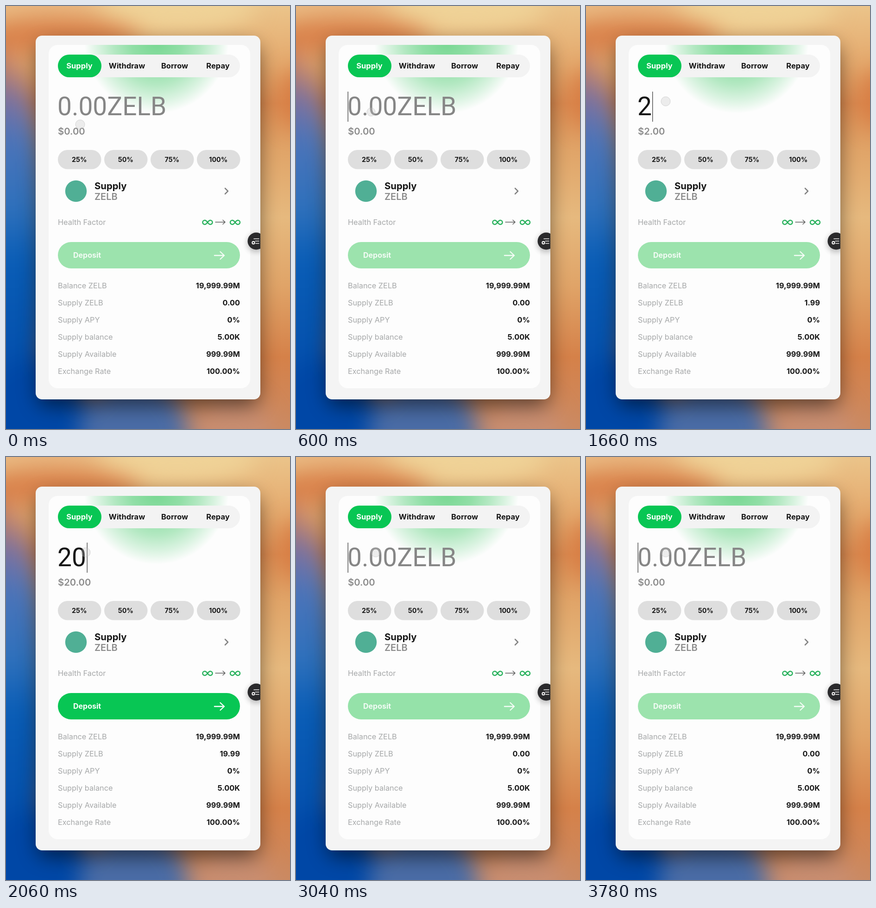
Write an HTML page that moves like this. It is 613x914 px and loops after 3.98 s.

```html
<!DOCTYPE html>
<html lang="en">
<head>
<meta charset="utf-8">
<title>Supply form</title>
<style>
html, body { margin: 0; width: 100%; height: 100%; overflow: hidden; background: #e2a468; }
svg { display: block; width: 613px; height: 914px; }
text { font-family: Inter, sans-serif; font-size: 16.3px; fill: #161616; }
.bold { font-weight: 700; }
.label { fill: #a6a8a9; }
.mid { text-anchor: middle; }
.end { text-anchor: end; }
.chip { font-size: 14.3px; font-weight: 700; }
.title { font-size: 20.3px; font-weight: 700; }
.sub { font-size: 20px; font-weight: 600; fill: #8b8b8b; }
.amount { font-family: Roboto, sans-serif; font-size: 55px; }
.line { fill: none; stroke-linecap: round; stroke-linejoin: round; }
</style>
</head>
<body>
<svg viewBox="0 0 613 914" xmlns="http://www.w3.org/2000/svg">
  <defs>
    <filter id="soft" x="-200" y="-200" width="1013" height="1314" filterUnits="userSpaceOnUse" color-interpolation-filters="sRGB">
      <feGaussianBlur stdDeviation="24"/>
    </filter>
    <filter id="shade" x="-40" y="-40" width="700" height="1010" filterUnits="userSpaceOnUse">
      <feGaussianBlur stdDeviation="22"/>
    </filter>
    <filter id="lift" x="480" y="450" width="120" height="130" filterUnits="userSpaceOnUse">
      <feGaussianBlur stdDeviation="6"/>
    </filter>
    <linearGradient id="left" x1="0" y1="0" x2="0" y2="914" gradientUnits="userSpaceOnUse">
      <stop offset=".07" stop-color="#dd8b57"/>
      <stop offset=".15" stop-color="#b9806f"/>
      <stop offset=".22" stop-color="#7c719f"/>
      <stop offset=".32" stop-color="#4b74b9"/>
      <stop offset=".48" stop-color="#2e70bb"/>
      <stop offset=".6" stop-color="#0a5db6"/>
      <stop offset="1" stop-color="#0047a6"/>
    </linearGradient>
    <linearGradient id="right" x1="0" y1="0" x2="0" y2="914" gradientUnits="userSpaceOnUse">
      <stop offset="0" stop-color="#ebc48a"/>
      <stop offset=".14" stop-color="#e4a86c"/>
      <stop offset=".23" stop-color="#db8c52"/>
      <stop offset=".34" stop-color="#e0a468"/>
      <stop offset=".5" stop-color="#e6b97e"/>
      <stop offset=".66" stop-color="#e0a468"/>
      <stop offset=".83" stop-color="#d58149"/>
      <stop offset="1" stop-color="#cb8a62"/>
    </linearGradient>
    <radialGradient id="glow" cx="325" cy="76" r="156" gradientUnits="userSpaceOnUse">
      <stop offset="0" stop-color="#25c050" stop-opacity=".62"/>
      <stop offset=".35" stop-color="#25c050" stop-opacity=".5"/>
      <stop offset=".6" stop-color="#25c050" stop-opacity=".34"/>
      <stop offset=".82" stop-color="#25c050" stop-opacity=".16"/>
      <stop offset="1" stop-color="#25c050" stop-opacity="0"/>
    </radialGradient>
    <clipPath id="inner"><rect x="92" y="84" width="435" height="742" rx="20"/></clipPath>
    <clipPath id="card"><rect x="64" y="64" width="485" height="786" rx="14"/></clipPath>
  </defs>

  <rect width="613" height="914" fill="url(#right)"/>
  <g id="blobs" filter="url(#soft)"></g>
  <rect x="68" y="84" width="477" height="780" rx="20" fill="#000" opacity=".55" filter="url(#shade)"/>

  <rect x="64" y="64" width="485" height="786" rx="14" fill="#f4f4f4"/>
  <rect x="92" y="84" width="435" height="742" rx="20" fill="#fdfdfd"/>
  <g clip-path="url(#inner)"><circle cx="325" cy="76" r="156" fill="url(#glow)"/></g>

  <rect x="112" y="105" width="393" height="49" rx="24.5" fill="#f3f3f3"/>
  <rect x="112" y="105" width="94" height="49" rx="24.5" fill="#08c654"/>
  <g id="form"></g>

  <text id="amount" class="amount" x="111" y="236"></text>
  <rect id="caret" y="185" width="1.4" height="65" fill="#4c4c4c"/>
  <text id="fiat" class="sub" x="112" y="278" style="font-size:20.3px"></text>

  <circle cx="151" cy="400" r="23.2" fill="#50af95"/>
  <path class="line" d="M473 394l6 6-6 6" stroke="#858585" stroke-width="2.6"/>

  <g class="line" stroke="#2bb25e" stroke-width="2.5">
    <path id="loop" d="M435 467.5c-3-4-4.500-4.500-6-4.500a4.500 4.500 0 0 0 0 9c1.500 0 3-.5 6-4.500s4.500-4.500 6-4.500a4.500 4.500 0 0 1 0 9c-1.500 0-3-.5-6-4.500z"/>
    <use href="#loop" x="59.500"/>
  </g>
  <path class="line" d="M452 467h21m-5-4.500l5 4.500-5 4.500" stroke="#5d5d5d" stroke-width="1.5"/>

  <rect id="button" x="112" y="510" width="393" height="57" rx="28.5"/>
  <g id="action">
    <text class="bold" x="145" y="544" style="font-size:16px;fill:#fff">Deposit</text>
    <path class="line" d="M450 539h21m-8.500-8l8.500 8-8.500 8" stroke="#fff" stroke-width="2.4"/>
  </g>

  <g clip-path="url(#card)">
    <circle cx="540" cy="512" r="20" fill="#000" opacity=".22" filter="url(#lift)"/>
    <circle cx="540" cy="508" r="18.5" fill="#2a2a2c"/>
    <path class="line" d="M535 503h11m-8 5h8m-7 5h7" stroke="#eee" stroke-width="1.5"/>
    <circle cx="534" cy="511.500" r="2.700" fill="none" stroke="#fff" stroke-width="2"/>
  </g>

  <circle id="pointer" fill="#c8c8c8" fill-opacity=".3" stroke="#a8a8a8" stroke-opacity=".42"/>
</svg>
<script>
const LOOP = 3980;
const TOKEN = 'ZELB';
const $ = id => document.getElementById(id);

function add(parent, tag, attrs, content = '') {
  const el = document.createElementNS('http://www.w3.org/2000/svg', tag);
  for (const key in attrs) el.setAttribute(key, attrs[key]);
  el.textContent = content;
  return parent.appendChild(el);
}

// Backdrop: cx, cy, rx, ry, fill
[
  [-45, 560, 140, 500, 'url(#left)'],
  [60, 940, 130, 180, '#0047a6'],
  [275, 930, 118, 130, '#4a6ca6'],
  [490, 930, 85, 90, '#c88d70'],
  [110, 66, 180, 40, '#d9814a'],
  [370, 0, 170, 55, '#efd297'],
  [60, -20, 150, 36, '#e9b680'],
  [628, 200, 34, 62, '#d77c43']
].forEach(([cx, cy, rx, ry, fill]) => add($('blobs'), 'ellipse', { cx, cy, rx, ry, fill }));

const form = $('form');
const write = (x, y, cls, content) => add(form, 'text', { x, y, class: cls }, content);

[['Supply', 158.500], ['Withdraw', 261], ['Borrow', 364], ['Repay', 457.500]].forEach(([name, x], i) => {
  const tab = write(x, 135, 'bold mid', name);
  tab.style.fontSize = '16.5px';
  if (!i) tab.style.fill = '#fff';
});

[25, 50, 75, 100].forEach((share, i) => {
  add(form, 'rect', { x: 112 + 100 * i, y: 311, width: 93.5, height: 41.5, rx: 20.7, fill: '#dedede' });
  write(158.3 + 100 * i, 337, 'chip mid', share + '%');
});

write(191, 396, 'title', 'Supply');
write(191, 418.5, 'sub', TOKEN);
write(112, 472.5, 'label', 'Health Factor');

const values = [
  ['Balance ' + TOKEN, '19,999.99M'],
  ['Supply ' + TOKEN, '0.00'],
  ['Supply APY', '0%'],
  ['Supply balance', '5.00K'],
  ['Supply Available', '999.99M'],
  ['Exchange Rate', '100.00%']
].map(([name, value], i) => {
  const y = 610 + 37 * i;
  write(112, y, 'label', name);
  return write(505, y, 'bold end', value);
});

// Typed steps: start time, input, supplied value
const typing = [[0, '', '0.00'], [1660, '2', '1.99'], [2000, '20', '19.99'], [2740, '2', '1.99'], [2920, '', '0.00']];
// Pointer path: time, x, y, radius
const path = [[0, 160, 256, 10], [540, 162, 229, 9], [620, 162, 229, 9], [1120, 172, 206, 10], [LOOP, 172, 206, 10]];

const clamp = v => Math.min(1, Math.max(0, v));
const ease = v => v * v * (3 - 2 * v);
const ramp = (t, from, to) => ease(clamp((t - from) / (to - from)));
const mix = (a, b, k) => a + (b - a) * k;

function setText(el, content) {
  if (el.textContent !== content) el.textContent = content;
}

function draw(t) {
  const [, input, supplied] = typing.filter(step => step[0] <= t).pop();
  setText($('amount'), input || '0.00' + TOKEN);
  $('amount').style.fill = input ? '#161616' : '#868686';
  setText($('fiat'), '$' + Number(input).toFixed(2));
  setText(values[1], supplied);

  const caretOn = (t >= 560 && t < 1080) || t >= 1660;
  $('caret').setAttribute('x', 111.5 + 31.5 * input.length);
  $('caret').style.opacity = caretOn ? 1 : 0;

  const active = ramp(t, 1660, 1800) - ramp(t, 2920, 3060);
  const rgb = [mix(156, 8, active), mix(227, 198, active), mix(173, 84, active)];
  $('button').style.fill = `rgb(${rgb.map(Math.round)})`;
  $('action').style.opacity = mix(0.88, 1, active);

  const i = Math.max(1, path.findIndex(p => p[0] > t));
  const from = path[i - 1], to = path[i];
  const k = ramp(t, from[0], to[0]);
  ['cx', 'cy', 'r'].forEach((name, n) => $('pointer').setAttribute(name, mix(from[n + 1], to[n + 1], k)));
}

const start = performance.now();
function tick() {
  draw((performance.now() - start) % LOOP);
  requestAnimationFrame(tick);
}
tick();
</script>
</body>
</html>
```
